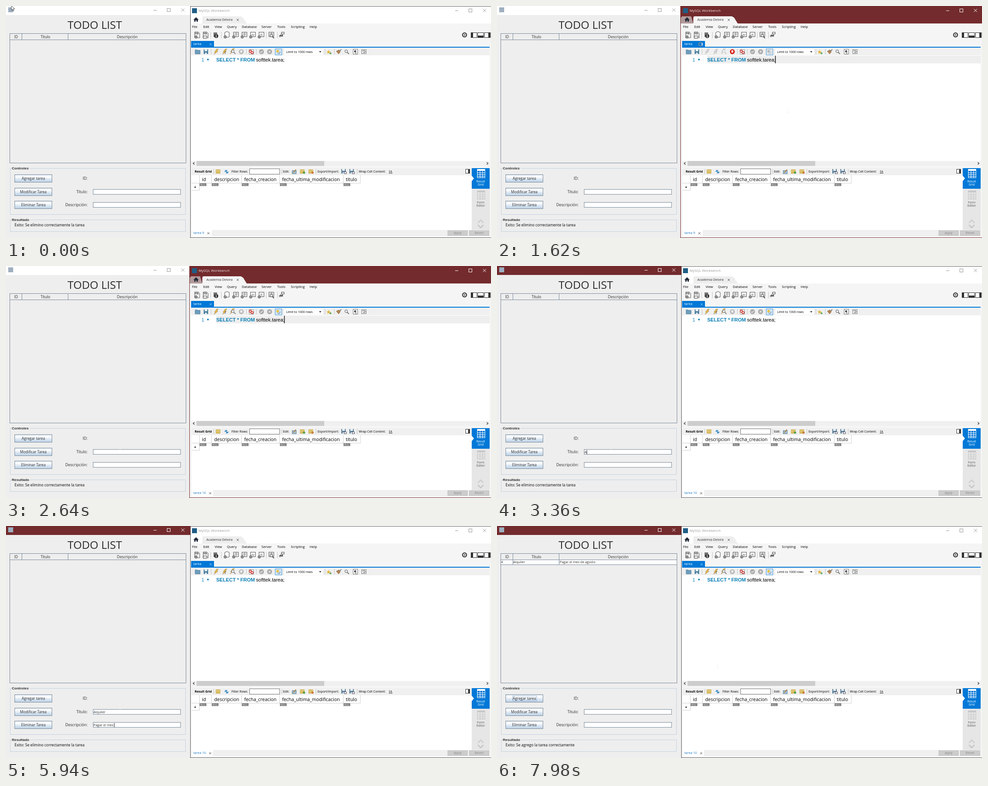
An HTML page with a canvas that plays this animation: 1082 px wide and 518 px high, repeating every 8000 ms.

```html
<!DOCTYPE html>
<html lang="es">
<head>
<meta charset="utf-8">
<style>
html, body { margin: 0; width: 100%; height: 100%; overflow: hidden; background: #eee; }
canvas { display: block; }
</style>
</head>
<body>
<canvas id="stage" width="1082" height="518"></canvas>
<script>
const g = document.getElementById('stage').getContext('2d');
const LOOP = 8000, CLICK_ADD = 7560;
const UI = '"Open Sans", "Noto Sans", sans-serif';
const ARIAL = '"Liberation Sans", Arial, sans-serif';
const MAROON = '#732b2d', BLUE = '#0078d7', STEEL = '#7a8a99', PALE = '#f0f0f0', INK = '#2b2b2b';
const TITLE = 'Alquiler', DETAIL = 'Pagar el mes de agosto';
// pointer: time, x, y
const PATH = [[0, 12, -1], [60, 12, -1], [660, 649, 233], [2220, 649, 233], [2640, 254, 414],
  [7140, 254, 414], [7200, 233, 414], [7500, 72, 388], [7620, 72, 388], [7980, 492, 311]];

const within = (v, a, b) => v >= a && v < b;

function box(x, y, w, h, fill, stroke) {
  if (fill) { g.fillStyle = fill; g.fillRect(x, y, w, h); }
  if (stroke) { g.strokeStyle = stroke; g.lineWidth = 1; g.strokeRect(x + .5, y + .5, w - 1, h - 1); }
}
function text(s, x, y, size, color = '#000', align = 'left', font = UI, weight = 400) {
  g.font = `${weight} ${size}px ${font}`;
  g.textAlign = align;
  g.fillStyle = color;
  g.fillText(s, x, y);
}
function poly(x, y, pts, fill, stroke, width = 1) {
  g.beginPath();
  for (let i = 0; i < pts.length; i += 2) g.lineTo(x + pts[i], y + pts[i + 1]);
  if (fill) { g.closePath(); g.fillStyle = fill; g.fill(); }
  if (stroke) { g.strokeStyle = stroke; g.lineWidth = width; g.stroke(); }
}
function disc(x, y, r, fill, stroke, width = 1) {
  g.beginPath();
  g.arc(x, y, r, 0, 7);
  if (fill) { g.fillStyle = fill; g.fill(); }
  if (stroke) { g.strokeStyle = stroke; g.lineWidth = width; g.stroke(); }
}
function cross(x, y, r, color, width = 1) {
  poly(x, y, [-r, -r, r, r], null, color, width);
  poly(x, y, [-r, r, r, -r], null, color, width);
}
const seps = (xs, y, h) => xs.forEach(x => box(x, y, 1, h, '#c4c4c4'));

function windowButtons(x, y, color) {
  box(x - 3, y, 7, 1, color);
  box(x + 27, y - 4, 8, 8, null, color);
  cross(x + 62.5, y, 3.5, color);
}

// ---------- task list window ----------
function button(label, y, pressed) {
  const grad = g.createLinearGradient(0, y, 0, y + 18);
  [[0, '#dde8f3'], [.3, '#fff'], [.5, '#e4edf6'], [1, '#b8cfe5']].forEach(s => grad.addColorStop(...s));
  box(19, y, 84, 18, pressed ? '#b8cfe5' : grad, STEEL);
  text(label, 61, y + 12, 8.25, INK, 'center');
}
function group(label, y, h, w) {
  box(9, y, 392, h, null, '#c3d2e0');
  box(12, y - 2, w, 5, '#eee');
  text(label, 13, y + 3, 8, INK, 'left', ARIAL, 700);
}
function field(y, value, caret) {
  box(194, y, 196, 12, '#fff', STEEL);
  text(value, 195.3, y + 8.8, 7.4, INK);
  if (caret) box(Math.round(195.3 + g.measureText(value).width), y + 2, 1, 9, '#222');
}
function typedTitle(t) {
  if (t < 3360) return 0;
  return t < 3780 ? 1 : Math.min(8, 2 + Math.floor((t - 3780) / 50));
}
function typedDetail(t) {
  if (t < 4500) return 0;
  if (t < 4620) return 1;
  if (t < 4980) return 2;
  if (t < 5160) return 4;
  if (t < 5340) return 5;
  return Math.min(22, 6 + Math.floor((t - 5340) / 78.75));
}
function taskWindow(t) {
  const active = t >= 2760, added = t >= CLICK_ADD;
  box(0, 0, 412, 518, '#eee');
  box(0, 0, 412, 20, active ? MAROON : '#fff');
  box(5, 3, 11, 11, '#9fb0c0');
  windowButtons(332, 9, active ? '#fff' : '#999');
  text('TODO LIST', 198, 50.8, 24.4, INK, 'center');

  box(8, 61, 394, 290, '#eee', STEEL);
  box(8, 75, 394, 1, STEEL);
  [35, 138].forEach(x => box(x, 62, 1, 13, STEEL));
  text('ID', 22.5, 72, 8.2, INK, 'center');
  text('Título', 88, 72, 8.2, INK, 'center');
  text('Descripción', 270.5, 72, 8.4, INK, 'center');
  if (added) {
    box(9, 76, 392, 10, '#fff');
    box(9, 86, 392, 1, STEEL);
    [35, 138].forEach(x => box(x, 76, 1, 10, STEEL));
    text('4', 9, 83.3, 7.4, INK);
    text(TITLE, 36, 83.3, 7.4, INK);
    text(DETAIL, 139.8, 83.3, 7.4, INK);
  }

  group('Controles', 362, 104, 40);
  button('Agregar tarea', 376, within(t, CLICK_ADD - 60, CLICK_ADD));
  button('Modificar Tarea', 406);
  button('Eliminar Tarea', 435);
  if (added) {
    g.setLineDash([1, 1]);
    box(34, 379, 55, 12, null, '#6382bf');
    g.setLineDash([]);
  }
  text('ID:', 182, 388, 8.6, INK, 'right');
  text('Título:', 182, 417.8, 8.6, INK, 'right');
  text('Descripción:', 182, 447.3, 8.7, INK, 'right');
  const titleCaret = within(t, 2760, 4260) && !within(t, 3180, 3360) && !within(t, 3600, 3780);
  const detailCaret = within(t, 4260, 6960) && !within(t, 4680, 4860);
  field(409, added ? '' : TITLE.slice(0, typedTitle(t)), titleCaret);
  field(438, added ? '' : DETAIL.slice(0, typedDetail(t)), detailCaret);

  group('Resultado', 477, 27, 42);
  text(added ? 'Exito: Se agrego la tarea correctamente' : 'Exito: Se elimino correctamente la tarea',
    19, 492, 8.45);
}

// ---------- icons ----------
function bolt(x, y, color, edge = '#8a7a5a') {
  poly(x, y, [1, -6, 5, -6, 1, -1, 4, -1, -5, 6, -2, 1, -4, 1], color, edge, .6);
}
function lens(x, y, color) {
  disc(x - 1, y - 1, 3, '#eef4f8', color);
  poly(x, y, [1.2, 1.2, 5, 5], null, color, 1.6);
}
function plus(x, y) {
  disc(x, y, 2.9, '#fff', '#333');
  poly(x, y, [-1.8, 0, 1.8, 0], null, '#333');
  poly(x, y, [0, -1.8, 0, 1.8], null, '#333');
}
function sheet(x, lines) {
  box(x - 5, 58, 12, 11, '#fafafa', '#555');
  if (lines) { box(x - 3, 61, 8, 1, '#888'); box(x - 3, 64, 8, 1, '#888'); box(x + 1, 59, 1, 9, '#888'); }
}
function grid(x, y, color, accent) {
  box(x, y, 10, 9, '#fff4b8', color);
  box(x, y + 3, 10, 1, color); box(x, y + 6, 10, 1, color);
  box(x + 3, y, 1, 9, color); box(x + 6, y, 1, 9, color);
  if (accent) disc(x + 9, y + 7, 2.5, accent);
}
function floppy(x, y, color) {
  box(x - 5, y - 5, 10, 10, color);
  box(x - 3, y - 5, 6, 4, '#e8f0f6');
  box(x - 2, y + 2, 4, 3, '#d5e2ec');
}

function mainToolbar() {
  [426, 445].forEach(x => {
    poly(x, 65, [-5, -7, 3, -7, 6, -4, 6, 6, -5, 6], '#fafafa', '#555');
    text('SQL', x, 63, 4.6, '#222', 'center', UI, 700);
  });
  plus(424, 69);
  poly(440, 70, [0, -3, 9, -3, 7, 2, 0, 2], '#fff', '#333');
  box(463, 59, 8, 10, '#777');
  disc(469, 67, 4.6, '#333');
  text('i', 469, 69.8, 8, '#fff', 'center', '"Noto Serif", serif', 700);
  poly(493, 64, [-5, -5, 0, -7, 5, -5, 5, 5, 0, 6, -5, 5], '#fafafa', '#555');
  plus(489, 69);
  [512, 531, 550, 569].forEach((x, i) => {
    sheet(x, i < 2);
    if (i > 1) text(i > 2 ? 'f()' : '$()', x + 1, 66, 5, '#333', 'center');
    plus(x - 4, 69);
  });
  sheet(591, true);
  lens(593, 67, '#333');
  box(614, 58, 7, 5, '#fff', '#444'); box(611, 65, 7, 3, '#555');
  poly(612, 63, [0, 7, -3, 4, 3, -1, 6, 3], null, '#444');
  seps([456, 480, 580, 605], 58, 14);
  disc(1023, 64.5, 4.5, '#ddd', '#333', 2);
  disc(1023, 64.5, 1.3, '#333');
  [1037, 1052, 1067].forEach(x => box(x, 59, 14, 12, '#fff', '#333'));
  box(1038, 60, 4, 10, '#333'); box(1053, 66, 12, 4, '#333'); box(1076, 60, 4, 10, '#333');
}
function queryToolbar(busy) {
  const y = 102, gray = '#b9b9b9', dim = busy ? '#c4c4c4' : '#666';
  const bright = busy ? '#d2d2d2' : '#ecb941', edge = busy ? '#bbb' : '#8a7a5a';
  poly(428, y, [-6, -4, -2, -4, -1, -3, 5, -3, 5, 5, -6, 5], '#6c9dbd', '#547f9c');
  floppy(446, y, '#4a7f9f');
  bolt(469, y, bright, edge);
  bolt(488, y, bright, edge);
  poly(489, y, [0, -2, 0, 5], null, dim, 1.3);
  bolt(505, y - 1, bright, edge);
  lens(507, y, dim);
  disc(525, y, 5.5, busy ? '#d8221c' : gray);
  box(523, y - 3, 4, 5, '#fff');
  box(542, y - 5, 11, 11, '#fff', '#999');
  disc(545, y - 1, 2.5, null, '#c8322b', 1.5);
  disc(549, y + 2, 2.5, null, '#c8322b', 1.5);
  disc(570, y, 5.5, '#a9a9a9');
  poly(570, y, [-3, 0, -1, 2, 3, -2], null, '#eee', 1.3);
  disc(588, y, 5.5, '#a9a9a9');
  cross(588, y, 2, '#eee', 1.3);
  box(600, 95, 16, 15, busy ? '#dce6ee' : '#cce4f7', '#5a9fd4');
  disc(606, y - 1, 3, busy ? '#bbb' : '#e9c34a');
  poly(609, y, [-3, 3, 0, 5, 3, 0], null, busy ? '#aaa' : '#668');
  box(621, 96, 86, 13, '#fff');
  text('Limit to 1000 rows', 625, 104.6, 6.9);
  poly(701, 101, [-2.5, 0, 2.5, 0, 0, 3], '#222');
  text('★', 719.5, 106.5, 13, '#dfb43c', 'center', '"DejaVu Sans", sans-serif');
  disc(724, 105.5, 2, '#5aa34a');
  poly(743, y, [-6, -1, 0, -4, 3, 0, -1, 5], '#b98552', '#735232', .7);
  poly(743, y, [2, -2, 5, -5], null, '#555', 1.5);
  lens(760, y, '#555');
  box(774, 96, 11, 12, '#fff', '#777');
  text('¶', 779.5, 105.5, 9, '#222', 'center');
  box(793, 97, 11, 10, '#fff', '#777');
  poly(798, y, [-3, -2, 3, -2, 3, 2, -2, 2], null, '#333');
  seps([457, 536, 558, 711, 732], 96, 12);
}

// ---------- result panel ----------
const COLUMNS = [['id', 437, 432], ['descripcion', 464.5, 459], ['fecha_creacion', 531.5, 526],
  ['fecha_ultima_modificacion', 616, 611], ['titulo', 758, 753]];

function scrollbar(y) {
  box(413, y, 666, 11, PALE);
  box(425, y, 285, 11, '#cdcdcd');
  poly(419, y + 5.5, [1.5, -2.5, -1.5, 0, 1.5, 2.5], null, '#333', 1.2);
  poly(1074, y + 5.5, [-1.5, -2.5, 1.5, 0, -1.5, 2.5], null, '#333', 1.2);
}
function emptyResult() {
  box(414, 362, 626, 138, '#e5e6e8');
  box(414, 362, 137, 68, '#fff');
  poly(543.5, 362.5, [8, 0, 0, 0, 0, 13, 8, 13], null, '#777');
  box(1039, 362, 40, 138, '#fff');
  scrollbar(502);
}
function sideIcon(y, ink, paper) {
  box(1051, y, 18, 20, paper, ink);
  box(1051, y, 18, 4, ink);
  for (let r = 8; r < 19; r += 4) box(1052, y + r, 16, 1, ink);
  [1057, 1063].forEach(x => box(x, y + 4, 1, 15, ink));
}
function resultPanel(run) {
  box(414, 362, 625, 16, PALE);
  text('Result Grid', 421, 372.4, 6.9, '#000', 'left', UI, 700);
  grid(468, 365, '#c09a2e');
  poly(492, 370, [-5, 0, -2, -4, 2, -3, 0, 0], '#3c8cc4');
  poly(492, 370, [5, 0, 2, 4, -2, 3, 0, 0], '#3c8cc4');
  text('Filter Rows:', 503, 372.4, 6.9);
  box(543, 363, 68, 13, '#fff', '#777');
  text('Edit:', 618, 372.4, 6.9);
  box(638, 367, 10, 8, '#a4c2d4', '#5d7f94');
  poly(643, 371, [-2, 1, 4, -6], null, '#b07a30', 1.8);
  grid(656, 365, '#c09a2e', '#4f9e44');
  grid(675, 365, '#c09a2e', '#c87a3a');
  text('Export/Import:', 695, 372.4, 6.9);
  [754, 772].forEach(x => { floppy(x - 1, 369, '#64839a'); box(x, 370, 6, 5, '#fff', '#556'); });
  text('Wrap Cell Content:', 787, 372.4, 6.9);
  text('IA', 858, 372, 7, '#222', 'center', '"Noto Serif", serif');
  box(854, 373, 8, 1, '#444');
  box(1025, 364, 10, 10, '#fff', '#333');
  box(1031, 364, 4, 10, '#333');
  seps([463, 615, 691, 783], 364, 11);

  box(414, 378, 625, 122, '#fff');
  box(414, 395, 377, 1, '#d0d0d0');
  [431, 458, 525, 610, 752, 790].forEach(x => box(x, 378, 1, 18, '#d0d0d0'));
  box(414, 411, 18, 1, '#d0d0d0');
  box(431, 395, 1, 17, '#d0d0d0');
  disc(422, 404.5, 1.7, '#444');
  COLUMNS.forEach(([name, x, cell]) => {
    text(name, x, 390.7, 10.4);
    box(cell, 396, 15, 6, '#777');
    text('NULL', cell + 7.5, 401, 5, '#fff', 'center');
  });

  box(1039, 362, 40, 138, '#e6e6e6');
  box(1039, 362, 40, 46, BLUE);
  poly(1039, 385, [0, -6, 5, 0, 0, 6], '#fff');
  sideIcon(364, '#fff', BLUE);
  sideIcon(412, '#c8c8c8', '#e6e6e6');
  text('Result', 1059, 394, 6.8, '#fff', 'center');
  text('Grid', 1059, 401, 6.8, '#fff', 'center');
  text('Form', 1059, 440.5, 6.8, '#555', 'center');
  text('Editor', 1059, 447.5, 6.8, '#555', 'center');
  poly(1059, 480, [-6, 4, 0, -2, 6, 4], null, '#cecece', 2.5);
  poly(1059, 491, [-6, -2, 0, 4, 6, -2], null, '#c6c6c6', 2.5);

  box(413, 500, 666, 14, PALE);
  box(414, 500, run > 9 ? 48 : 45, 14, '#fff');
  text('tarea ' + run, 418, 509.3, 7.35, '#1a78c2');
  cross(run > 9 ? 455.5 : 451.5, 507.5, 2.2, '#444');
  [[985, 'Apply'], [1033, 'Revert']].forEach(([x, s]) => {
    box(x, 501, 45, 12, '#ccc', '#c2c2c2');
    text(s, x + 22.5, 509.4, 6.7, '#888', 'center');
  });
}

// ---------- database window ----------
function databaseWindow(t) {
  const active = within(t, 900, 2760), busy = within(t, 1560, 1740);
  const left = active ? 409 : 411, edge = active ? MAROON : '#5a5555';
  box(left, 0, 1082 - left, 518, edge);
  box(left + 1, 1, 1081 - left, 516, '#f5f5f5');
  box(left + 1, 1, 1081 - left, 38, active ? MAROON : '#fff');
  box(415, 5, 11, 11, '#1f5e86');
  text('MySQL Workbench', 429.7, 13.3, 7.85, active ? '#eee4e4' : '#999');
  windowButtons(1005, 10, active ? '#fff' : '#999');

  if (active) poly(410, 23, [0, 16, 0, 3, 3, 0, 23, 0, 28, 16], '#b29a9b');
  poly(424, 30, [-6, 1, 0, -5, 6, 1, 4, 1, 4, 5, 1, 5, 1, 2, -1, 2, -1, 5, -4, 5, -4, 1], '#222b36');
  poly(438, 23, [0, 16, 0, 2, 2, 0, 86, 0, 91, 3, 99, 16], active ? '#f5f5f5' : '#eee');
  text('Academia Delvira', 447, 33.4, 7.26, INK);
  cross(517, 31, 2.3, '#555');

  [['File', 415], ['Edit', 440], ['View', 465.5], ['Query', 493], ['Database', 526], ['Server', 570],
    ['Tools', 605], ['Scripting', 635.5], ['Help', 677.5]].forEach(([s, x]) => text(s, x, 49.3, 7.6));
  mainToolbar();

  box(413, 78, 51, 14, BLUE);
  box(413, 91, 666, 2, BLUE);
  text('tarea', 418, 87.4, 7.4, '#fff');
  if (busy) {
    disc(454, 85.5, 4, null, '#6d8799', 2.2);
    g.beginPath();
    g.arc(454, 85.5, 4, t / 90, t / 90 + 1.6);
    g.strokeStyle = '#cfe3f2';
    g.stroke();
  } else cross(456.5, 85.5, 2, '#b9dcf5');

  box(413, 93, 666, 17, PALE);
  queryToolbar(busy);
  box(413, 110, 666, 236, '#fff');
  if (active) box(469, 111, 610, 17, '#eee');
  text('1', 436, 123.5, 11, '#1b86c0', 'left', ARIAL);
  disc(450.5, 119.5, 2, '#1b86c0');
  text('SELECT * FROM', 469, 123.5, 11, '#0a7fb5', 'left', ARIAL, 700);
  text('softtek.tarea;', 557.8, 123.5, 11, '#000', 'left', ARIAL);
  const caret = active && !within(t, 1320, 1500) && !within(t, 1980, 2220);
  if (caret) box(620.5, 111, 1.3, 17, '#000');
  scrollbar(346);
  box(413, 357, 666, 5, '#f5f5f5');
  if (within(t, 1680, 1740)) emptyResult();
  else resultPanel(t < 1740 ? 9 : 10);
}

function pointer(t) {
  let i = PATH.length - 1;
  while (i > 0 && PATH[i][0] > t) i--;
  const a = PATH[i], b = PATH[i + 1] || a;
  const u = b === a ? 0 : (t - a[0]) / (b[0] - a[0]);
  const k = u * u * (3 - 2 * u);
  const x = a[1] + (b[1] - a[1]) * k, y = a[2] + (b[2] - a[2]) * k;
  const inEditor = x > 413 && within(y, 110, 346);
  const inField = within(x, 194, 390) && (within(y, 409, 421) || within(y, 438, 450));
  if (inEditor || inField) {
    const c = inEditor ? '#f3f3f3' : '#fff';
    box(Math.round(x), Math.round(y) - 5, 1, 11, c);
    box(Math.round(x) - 3, Math.round(y) + 5, 6, 1, c);
  } else {
    poly(x, y, [0, 0, 0, 10.5, 2.4, 8.2, 4, 12, 5.7, 11.2, 4.1, 7.6, 7.3, 7.4], '#fff', '#222', .8);
  }
}

function draw(now) {
  const t = now % LOOP;
  taskWindow(t);
  databaseWindow(t);
  pointer(t);
}
const start = performance.now();
(function tick() {
  draw(performance.now() - start);
  requestAnimationFrame(tick);
})();
</script>
</body>
</html>
```
